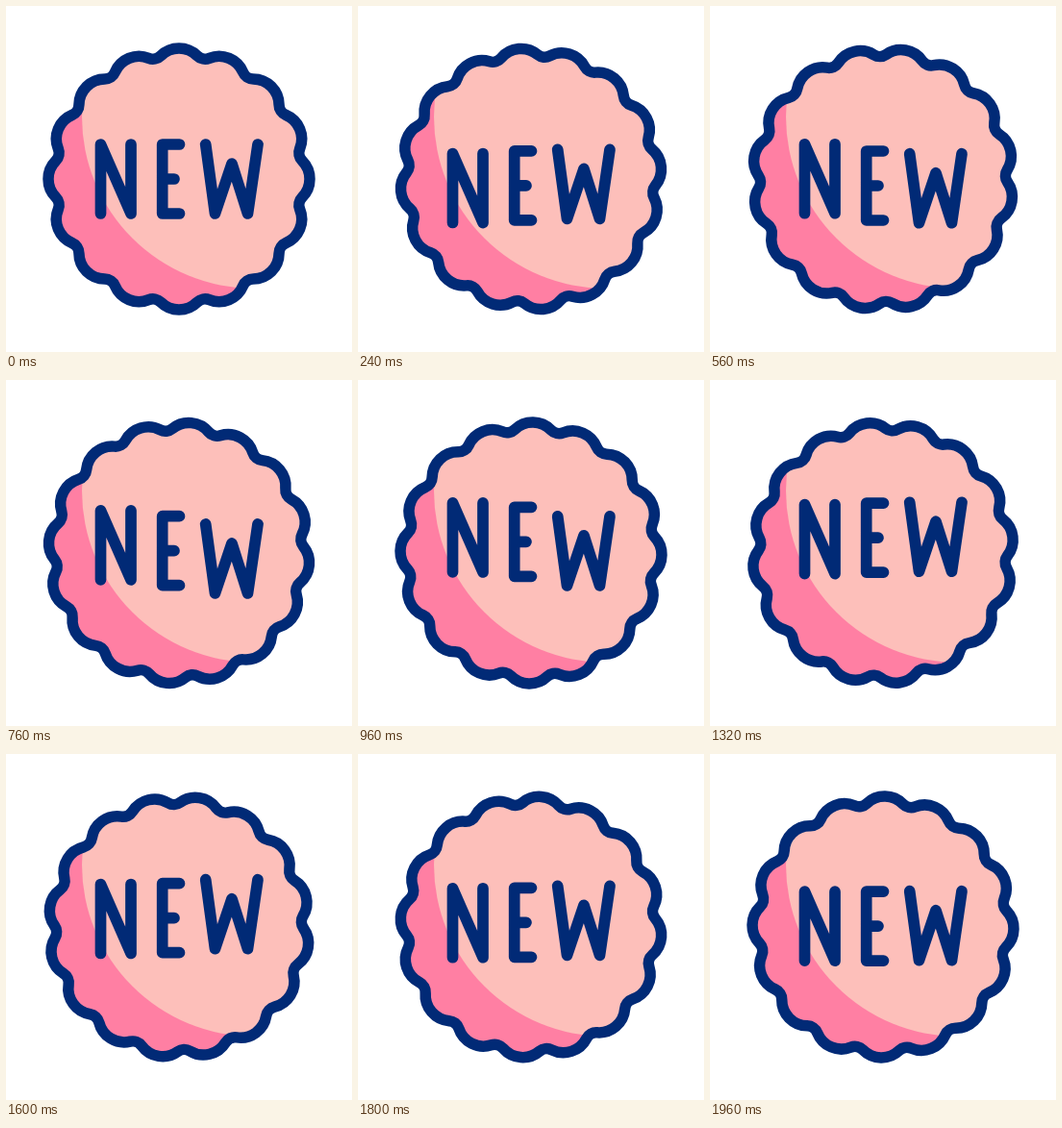
These frames come from a looping animation (360x360 px, 2000 ms). An HTML page:

```html
<!DOCTYPE html>
<html lang="en">
<head>
<meta charset="utf-8">
<title>New badge</title>
<style>
  html, body { margin: 0; width: 100%; height: 100%; overflow: hidden; background: #fff; }
  svg { display: block; width: 100vw; height: 100vh; }
  .line { fill: none; stroke: #012a76; stroke-linecap: round; stroke-linejoin: round; }
</style>
</head>
<body>
<svg viewBox="0 0 360 360" role="img" aria-label="NEW">
  <defs>
    <path id="badge"/>
    <clipPath id="inside"><use href="#badge"/></clipPath>
  </defs>
  <use href="#badge" fill="#ff7fa3"/>
  <circle cx="258" cy="115" r="179" fill="#fdbfba" clip-path="url(#inside)"/>
  <use href="#badge" class="line" stroke-width="11.5"/>
  <g class="line" stroke-width="11.7">
    <path class="letter" d="M98.5 216V144L130 216V144"/>
    <path class="letter" d="M180.5 144H162.7V216H180.5M162.7 180H175"/>
    <path class="letter" d="M207.7 144L217.5 216L235 164L251.5 216L262 144"/>
  </g>
</svg>
<script>
const LOOP = 2000, STEP = 40, LOBES = 16;
const badge = document.getElementById('badge');
const letters = document.querySelectorAll('.letter');

// Times at which each letter is lowest and highest.
const swings = [[300, 1060], [495, 1140], [660, 1400]];

// Round lobes joined by tangent arcs in the valleys.
function badgePath() {
  const peak = 136, valley = 127.5, lobeR = 27, half = Math.PI / LOBES;
  const lobeD = peak - lobeR, reach = 2 * lobeD * Math.cos(half);
  const valleyR = (valley ** 2 - reach * valley + lobeD ** 2 - lobeR ** 2) /
                  (reach + 2 * lobeR - 2 * valley);
  const valleyD = valley + valleyR, share = lobeR / (lobeR + valleyR);
  const joinX = valleyD * Math.sin(half) * share;
  const joinY = lobeD + (valleyD * Math.cos(half) - lobeD) * share;
  const joinR = Math.hypot(joinX, joinY), joinA = Math.atan2(joinX, joinY);
  const at = a => `${(180 + joinR * Math.sin(a)).toFixed(2)} ${(180 - joinR * Math.cos(a)).toFixed(2)}`;

  let d = 'M' + at(-joinA);
  for (let i = 0; i < LOBES; i++) {
    const a = 2 * half * i;
    d += `A${lobeR} ${lobeR} 0 0 1 ${at(a + joinA)}`;
    d += `A${valleyR} ${valleyR} 0 0 0 ${at(a + 2 * half - joinA)}`;
  }
  return d + 'Z';
}

function letterOffset(t, [low, high]) {
  if (t < low) return 10 * Math.sin(Math.PI / 2 * t / low);
  if (t < high) return 10 - 30 * (t - low) / (high - low);
  return -20 * (LOOP - t) / (LOOP - high);
}

function draw(t) {
  badge.setAttribute('transform', `rotate(${-45 * t / LOOP} 180 180)`);
  letters.forEach((letter, i) =>
    letter.setAttribute('transform', `translate(0 ${letterOffset(t, swings[i]).toFixed(2)})`));
}

badge.setAttribute('d', badgePath());
const start = performance.now();
function tick() {
  const t = (performance.now() - start) % LOOP;
  draw(Math.floor(t / STEP) * STEP);
  requestAnimationFrame(tick);
}
tick();
</script>
</body>
</html>
```
